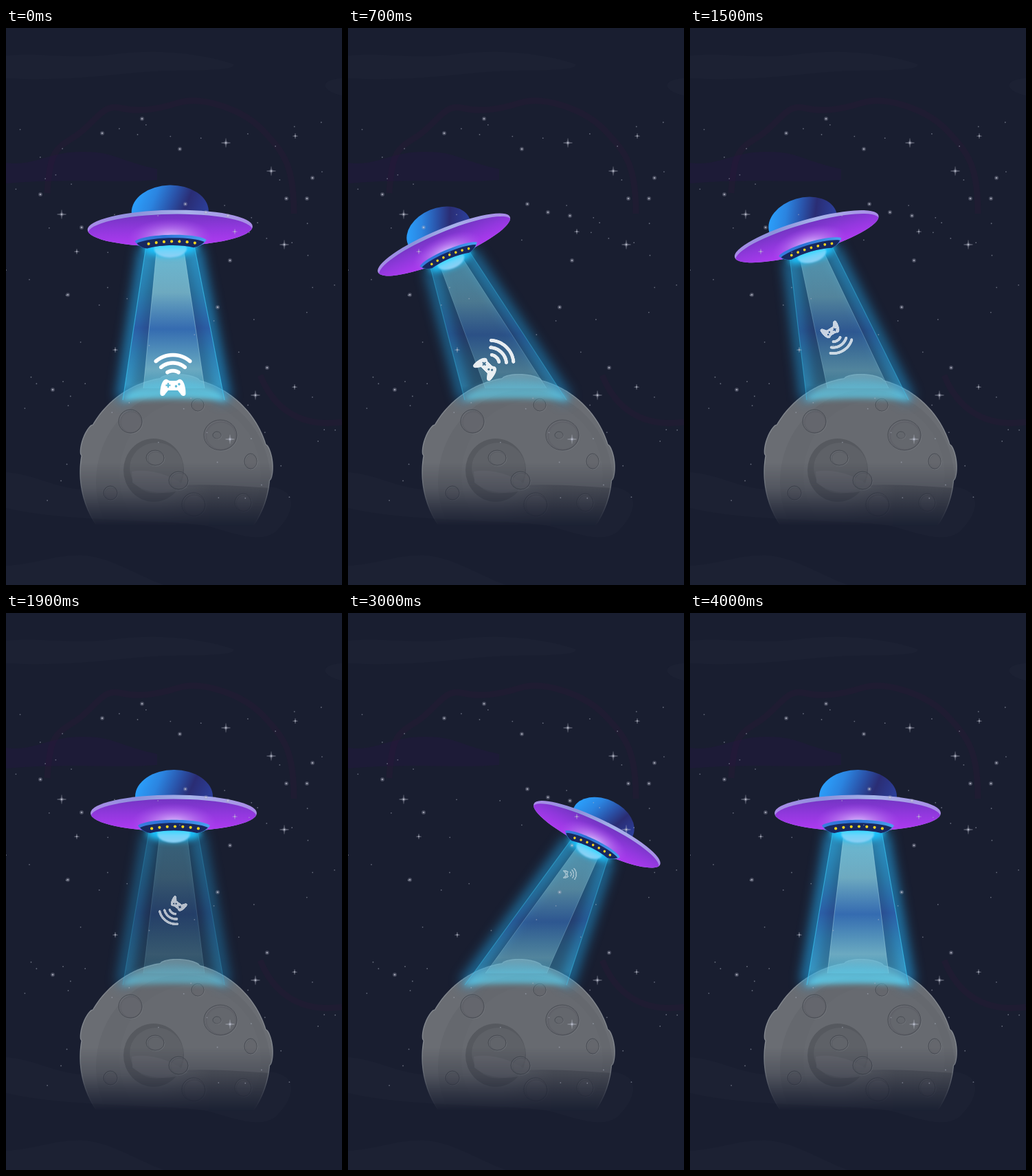
An HTML page with a canvas for the animation above (4200 ms loop, 489x810 px).

```html
<!DOCTYPE html>
<html lang="en">
<head>
<meta charset="utf-8">
<title>UFO over the moon</title>
<style>
html, body { margin: 0; width: 489px; height: 810px; overflow: hidden; background: #191e30; }
canvas { display: block; }
</style>
</head>
<body>
<canvas id="stage" width="489" height="810"></canvas>
<script>
const W = 489, H = 810, LOOP = 4200, STEP = 100, TRIP = 4000, TURN = 1900, TAU = Math.PI * 2;
const ctx = document.getElementById('stage').getContext('2d');

function layer(w, h, paint) {
  const c = document.createElement('canvas');
  c.width = w;
  c.height = h;
  paint(c.getContext('2d'));
  return c;
}

function ramp(gradient, ...stops) {
  stops.forEach(([at, color]) => gradient.addColorStop(at, color));
  return gradient;
}

function oval(g, x, y, rx, ry, fill, stroke) {
  g.beginPath();
  g.ellipse(x, y, rx, ry, 0, 0, TAU);
  if (fill) { g.fillStyle = fill; g.fill(); }
  if (stroke) { g.strokeStyle = stroke; g.lineWidth = 1; g.stroke(); }
}

function shape(g, d, fill) {
  g.fillStyle = fill;
  g.fill(new Path2D(d));
}

function quad(g, pts, fill) {
  g.beginPath();
  pts.forEach(p => g.lineTo(...p));
  g.fillStyle = fill;
  g.fill();
}

function line(g, a, b, color, width) {
  g.beginPath();
  g.moveTo(...a);
  g.lineTo(...b);
  g.strokeStyle = color;
  g.lineWidth = width;
  g.stroke();
}

function seeded(seed) {
  return () => (seed = seed * 16807 % 2147483647) / 2147483647;
}

const sky = layer(W, H, g => {
  g.fillStyle = '#191e30';
  g.fillRect(0, 0, W, H);
  const haze = '#1c2133';
  shape(g, 'M0 40C60 36 100 46 160 38S290 38 332 53C330 64 270 60 215 63S100 78 0 73Z', haze);
  shape(g, 'M489 73C470 74 462 80 465 86S480 97 489 98Z', haze);
  shape(g, 'M0 646C50 650 70 672 130 672S350 660 390 668S415 710 395 730S340 738 300 726S90 720 0 698Z', haze);
  shape(g, 'M0 782C40 780 70 766 110 767S190 796 230 810H0Z', haze);
  shape(g, 'M0 196C40 202 60 180 110 180S160 192 220 205V221C160 226 80 218 0 226Z', 'rgba(42,20,76,.24)');
  g.strokeStyle = 'rgba(62,22,60,.17)';
  g.lineWidth = 9;
  g.stroke(new Path2D('M60 240C64 178 72 176 100 158S140 110 165 116S215 120 250 109S345 118 375 150S419 200 419 270'));
  g.stroke(new Path2D('M370 505C388 550 425 582 489 573'));
});

const moon = layer(W, H, g => {
  const CX = 246, CY = 646, R = 138;
  const bump = (a, mid, half) => Math.sqrt(Math.max(0, 1 - ((a - mid) / half) ** 2));
  const body = new Path2D();
  for (let d = -215; d <= 35; d++) {
    const r = R + 4.5 * (bump(d, -87, 12) + bump(d, -160, 10) + bump(d, -6, 11));
    const a = d / 360 * TAU;
    body.lineTo(CX + r * Math.cos(a), CY + r * Math.sin(a));
  }
  body.closePath();
  g.save();
  g.clip(body);
  g.fillStyle = '#6a6d73';
  g.fillRect(0, 0, W, H);
  oval(g, 258, 660, 127, 134, '#65686e');
  oval(g, 268, 650, 103, 108, '#676a70');
  shape(g, 'M225 667C280 661 340 666 385 669V730H225Z',
    ramp(g.createLinearGradient(225, 0, 300, 0), [0, 'rgba(48,51,60,0)'], [1, 'rgba(48,51,60,.32)']));
  g.restore();
  g.strokeStyle = 'rgba(142,146,152,.85)';
  g.lineWidth = 1.4;
  g.stroke(body);

  const crater = (x, y, rx, ry = rx) => {
    oval(g, x, y, rx, ry, 'rgba(79,82,89,.3)');
    oval(g, x + 1, y + 1, rx, ry, null, 'rgba(125,128,133,.5)');
    oval(g, x, y, rx, ry, null, 'rgba(69,72,79,.85)');
    oval(g, x + 1, y + 1, rx * .86, ry * .86, 'rgba(105,108,114,.5)');
  };
  oval(g, 215, 643, 44, 46, '#56595f');
  oval(g, 219, 640, 39, 37, '#5e6167');
  shape(g, 'M183 645C210 640 240 650 265 668C240 680 205 679 184 661Z', 'rgba(103,106,112,.8)');
  crater(181, 572, 17);
  crater(312, 592, 24, 22);
  crater(307, 592, 6, 5);
  crater(279, 548, 9);
  crater(356, 630, 9, 11);
  crater(217, 625, 13, 11);
  crater(251, 658, 14, 13);
  crater(152, 676, 10);
  crater(273, 693, 17);
  crater(345, 690, 12, 13);

  g.globalCompositeOperation = 'destination-out';
  g.fillStyle = ramp(g.createLinearGradient(0, 632, 0, 724),
    [0, 'rgba(0,0,0,0)'], [.4, 'rgba(0,0,0,.28)'], [.72, 'rgba(0,0,0,.7)'], [1, '#000']);
  g.fillRect(0, 632, W, H);
});

const stars = layer(W, H, g => {
  const glow = (x, y, r) => {
    oval(g, x, y, r, r, 'rgba(165,170,188,.3)');
    oval(g, x, y, r * .45, r * .45, 'rgba(205,208,218,.65)');
  };
  const spark = (x, y, r) => {
    oval(g, x, y, r, .55, 'rgba(200,204,215,.6)');
    oval(g, x, y, .55, r, 'rgba(200,204,215,.6)');
    glow(x, y, r * .4);
  };
  const big = [[320, 167], [386, 208], [81, 271], [405, 315], [363, 534], [326, 598]];
  const small = [[421, 157], [333, 296], [103, 325], [159, 468], [420, 522]];
  const dots = [[198, 132], [140, 153], [253, 176], [50, 242], [110, 290], [408, 248], [438, 248],
    [446, 218], [326, 338], [90, 388], [308, 406], [261, 256], [291, 268], [323, 273], [380, 494], [68, 526]];
  big.forEach(([x, y]) => spark(x, y, 7));
  small.forEach(([x, y]) => spark(x, y, 4));
  dots.forEach(([x, y]) => glow(x, y, 3));
  const rnd = seeded(41);
  for (let i = 0; i < 75; i++) {
    oval(g, rnd() * W, 130 + rnd() * 565, .9, .9, 'rgba(180,185,200,.5)');
  }
});

const badge = layer(160, 160, g => {
  g.translate(80, 80);
  g.scale(2, 2);
  g.strokeStyle = '#fff';
  g.lineCap = 'round';
  g.lineWidth = 5.6;
  for (let i = 0; i < 3; i++) {
    const half = i ? .7 : .55;
    g.beginPath();
    g.arc(0, 9, 15.5 + i * 11.5, -TAU / 4 - half, -TAU / 4 + half);
    g.stroke();
  }
  shape(g, 'M-11 6C-8 5 -7 8 -4 8H4C7 8 8 5 11 6C16 7 19 19 18.5 27C18 31 13 31 11 27L7 22H-7L-11 27C-13 31 -18 31 -18.5 27C-19 19 -16 7 -11 6Z', '#fff');
  g.globalCompositeOperation = 'destination-out';
  g.fillRect(-10.5, 13.5, 7, 2.2);
  g.fillRect(-8.1, 11.1, 2.2, 7);
  oval(g, 4.5, 16, 1.7, 1.7, '#000');
  oval(g, 9, 13, 1.7, 1.7, '#000');
});

// Rises from 0 to 1 at peak and falls back to 0, rounded at the top
function hump(t, from, peak, to) {
  return 1 - (Math.abs(t - peak) / (t < peak ? peak - from : to - peak)) ** 1.45;
}

function swing(t) {
  return t < TURN ? -127 * hump(t, -30, 1020, TURN) : 126 * hump(t, TURN, 2830, TRIP);
}

function drawBeam(place, light) {
  const tl = place(-36, 27), tr = place(35, 27), il = place(-20, 28), ir = place(19, 28);
  const bl = [170, 541], br = [318, 541], jl = [200, 524], jr = [289, 524];
  const top = (tl[1] + tr[1]) / 2;
  const fade = (...stops) => ramp(ctx.createLinearGradient(0, top, 0, 541), ...stops);

  ctx.save();
  ctx.filter = 'blur(9px)';
  ctx.globalAlpha = .3 + .5 * light;
  line(ctx, tl, bl, '#22a6ea', 17);
  line(ctx, tr, br, '#22a6ea', 17);

  ctx.filter = 'none';
  ctx.globalAlpha = light;
  quad(ctx, [tl, tr, br, bl], fade([0, 'rgba(48,165,215,.7)'], [.3, 'rgba(46,138,190,.66)'],
    [.53, 'rgba(47,92,174,.75)'], [.7, 'rgba(52,139,196,.68)'], [.9, 'rgba(70,180,225,.6)'], [1, 'rgba(70,190,232,0)']));
  quad(ctx, [il, ir, jr, jl], fade([0, 'rgba(125,206,228,.75)'], [.3, 'rgba(150,208,220,.64)'],
    [.54, 'rgba(62,132,204,.55)'], [.8, 'rgba(150,210,222,.58)'], [.94, 'rgba(112,212,236,.3)']));
  for (const [a, b] of [[tl, bl], [tr, br]]) line(ctx, a, b, 'rgba(60,205,250,.6)', 1.2);
  for (const [a, b] of [[il, jl], [ir, jr]]) line(ctx, a, b, 'rgba(165,215,230,.45)', 1);

  ctx.filter = 'blur(4px)';
  ctx.globalAlpha = .5 + .5 * light;
  shape(ctx, 'M168 542C200 500 288 500 322 542Q244 535 168 542Z',
    ramp(ctx.createLinearGradient(0, 508, 0, 544),
      [0, 'rgba(85,190,222,.2)'], [.5, 'rgba(95,208,238,.65)'], [1, 'rgba(90,222,255,.95)']));
  ctx.restore();
}

function drawShip() {
  oval(ctx, .5, -24, 56.5, 39, ramp(ctx.createLinearGradient(-50, -46, 46, -4),
    [0, '#2ba0fc'], [.25, '#2b84e0'], [.5, '#2a52a8'], [.7, '#2a2d74'], [1, '#2c3f9a']));

  oval(ctx, 0, 0, 121, 26.5, ramp(ctx.createLinearGradient(-121, 0, 121, 0),
    [0, '#a98ce8'], [.3, '#8d92dc'], [.6, '#a6b2ea'], [1, '#a88ae6']));
  ctx.save();
  ctx.clip();
  oval(ctx, 0, 5, 120.5, 25.5, ramp(ctx.createLinearGradient(0, -20, 0, 27),
    [0, '#7435c4'], [.45, '#9138dd'], [1, '#b23af3']));
  ctx.translate(0, 14);
  ctx.scale(1, .45);
  oval(ctx, 0, 0, 62, 62, ramp(ctx.createRadialGradient(0, 0, 12, 0, 0, 62),
    [0, 'rgba(214,178,250,.85)'], [.55, 'rgba(190,130,242,.4)'], [1, 'rgba(175,90,240,0)']));
  ctx.restore();

  ctx.save();
  ctx.filter = 'blur(5px)';
  oval(ctx, 0, 29, 40, 12, '#1cc4ff');
  ctx.filter = 'blur(1px)';
  oval(ctx, 0, 30, 24, 13, ramp(ctx.createLinearGradient(0, 24, 0, 43),
    [0, '#2ed8ff'], [.45, '#70d4fb'], [1, '#91cff3']));
  ctx.restore();

  shape(ctx, 'M-52 18C-38 7 39 7 53 18C48 26 41 28 34 29C14 24 -14 24 -34 29C-42 28 -48 25 -52 18Z',
    ramp(ctx.createLinearGradient(-52, 0, 53, 0), [0, '#397ee0'], [.4, '#2b70d4'], [1, '#4aa1f1']));
  shape(ctx, 'M-49 21C-30 12 31 12 50 21C45 26 40 28 34 29C14 24 -14 24 -34 29C-41 28 -46 25 -49 21Z', '#17285f');
  for (let i = -3; i <= 3; i++) oval(ctx, 2 + i * 11.3, 19.5 + i * i * .32, 2.1, 2.1, '#f8d51f');
}

function draw(t) {
  const u = t / TRIP;
  const dx = swing(t), x = 244 + dx, y = 291 + dx * dx * .0022;
  const tilt = dx * .218 / 360 * TAU, size = 1 - Math.abs(dx) * .00133;
  const cos = Math.cos(tilt) * size, sin = Math.sin(tilt) * size;
  const place = (px, py) => [x + px * cos - py * sin, y + px * sin + py * cos];
  const light = .66 + .17 * Math.cos(TAU * u) + .17 * Math.cos(3 * TAU * u);

  ctx.drawImage(sky, 0, 0);
  ctx.drawImage(moon, 0, 0);
  drawBeam(place, light);

  const zoom = 1 - u ** 1.35;
  ctx.save();
  ctx.globalAlpha = (1 - u) ** .65;
  ctx.translate(244 + dx * (.2 + .62 * u), 505 - 177 * u ** 1.2);
  ctx.rotate(1.97 * TAU * u ** 1.6);
  ctx.scale(zoom, zoom);
  ctx.drawImage(badge, -40, -40, 80, 80);
  ctx.restore();

  ctx.save();
  ctx.translate(x, y);
  ctx.rotate(tilt);
  ctx.scale(size, size);
  drawShip();
  ctx.restore();

  ctx.drawImage(stars, 0, 0);
}

const start = performance.now();
let shown = -1;
function tick() {
  const t = (performance.now() - start) % LOOP;
  const now = Math.min(TRIP, Math.floor(t / STEP) * STEP);
  if (now !== shown) draw(shown = now);
  requestAnimationFrame(tick);
}
tick();
</script>
</body>
</html>
```
